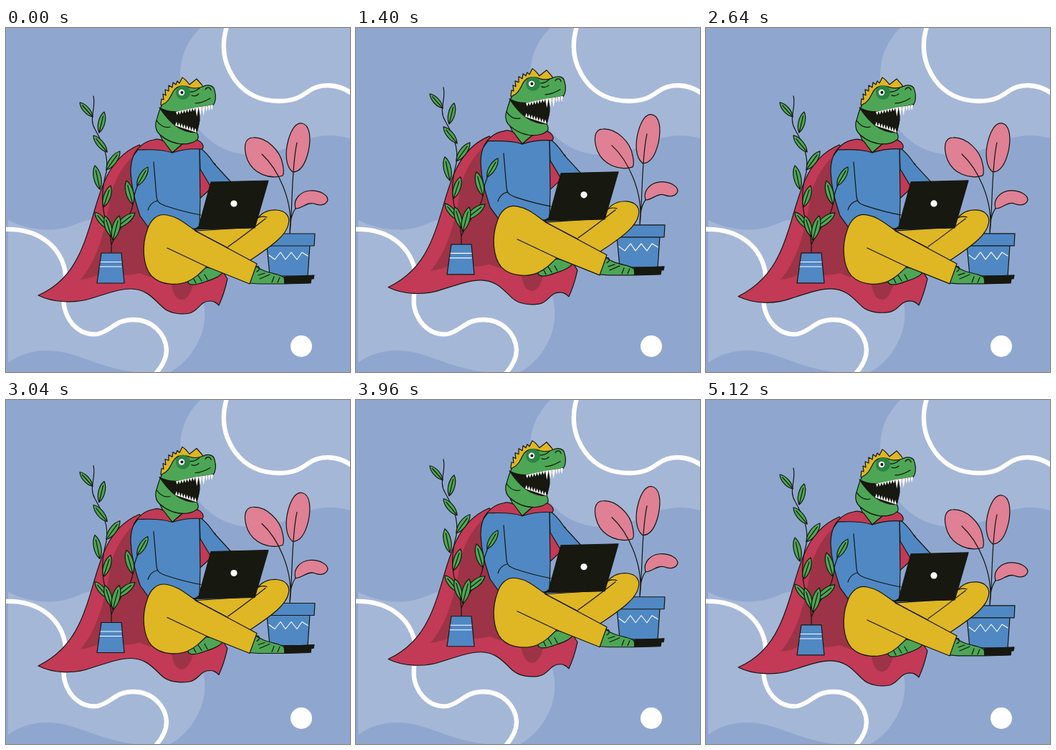
Write an HTML page that moves like this. It is 480 by 480 pixels and loops after 5.16 s.

```html
<!DOCTYPE html>
<html>
<head>
<meta charset="utf-8">
<style>
html, body { margin: 0; height: 100%; overflow: hidden; background: #8fa7cf }
svg { display: block; width: 100vw; height: 100vh }
.ink { stroke: #15170f; stroke-width: 1.2; stroke-linejoin: round; stroke-linecap: round }
.line { fill: none }
.red { fill: #c23a56 }
.dark { fill: #9d3346; stroke: none }
.blue { fill: #5088c4 }
.green { fill: #4da655 }
.yellow { fill: #dfb623 }
.pink { fill: #df8095 }
.black { fill: #17180f }
.blob { fill: #a5b7d7 }
.ribbon { fill: none; stroke: #fff; stroke-width: 6.3 }
.white { fill: #fff; stroke: none }
.trim { fill: none; stroke: #fff; stroke-width: 1.1 }
</style>
</head>
<body>
<svg viewBox="0 0 480 480">
  <path class="blob" d="M271 0C251 20 243 42 243 69C243 110 268 153 305 169C338 183 372 177 402 163C430 149 455 147 480 154V0Z"/>
  <path class="blob" d="M3 268C36 284 70 286 100 273C150 250 220 285 255 335C283 375 282 413 267 440C257 459 245 471 229 480H180C150 477 127 467 100 458C62 445 30 448 3 467Z"/>
  <path class="ribbon" d="M308 -2C300 25 304 51 320 73C335 93 357 102 381 102C402 102 411 96 421 89C439 76 464 78 482 91"/>
  <path class="ribbon" d="M-2 281C42 279 74 302 82 337C86 357 77 376 82 392C88 415 107 430 128 427C148 422 152 407 178 407C204 407 223 427 224 449C224 462 218 472 209 482"/>
  <circle class="white" cx="412" cy="444" r="15"/>

  <g id="scene" class="ink">
    <path id="cape" class="red"/>
    <path class="dark" d="M181 176C163 190 149 216 145 240C139 281 127 325 104 351C121 349 132 345 143 333C154 346 170 347 186 342L202 348L206 270L180 235Z"/>
    <path class="dark" d="M230 354C233 372 238 380 247 379C256 377 262 361 263 346Z"/>

    <g id="bigPlant">
      <path class="pink" d="M386 206C368 212 345 203 337 184C331 168 332 153 345 153C363 152 383 171 386 190C388 199 388 203 386 206Z"/>
      <path class="pink" d="M400 201C390 193 389 174 394 156C399 139 406 132 413 133C424 135 426 153 422 172C418 189 411 201 400 201Z"/>
      <path class="pink" d="M404 252C400 239 411 228 424 227C438 226 449 233 449 240C446 248 437 248 430 245C420 242 412 253 404 252Z"/>
      <path class="line" d="M357 176C378 195 402 240 396 287M406 160C398 195 400 255 396 287M404 252C398 260 396 270 396 287"/>
      <path class="blue" d="M364 303H424L421 346H368Z"/>
      <path class="blue" d="M359 287H431L430 304H361Z"/>
      <path class="trim" d="M367 317L375 323L383 313L390 323L398 313L406 323L413 313L421 318"/>
    </g>

    <path class="red" d="M265 172L292 190L288 222L266 242Z"/>
    <path class="blue" d="M270 167C281 174 286 183 291 190L314 215L286 222L271 197Z"/>
    <path class="blue" d="M184 169C176 177 174 188 174 201C175 225 181 243 187 262L200 280H270L271 240L270 168Z"/>
    <path class="line" d="M206 187L210 235C211 243 214 245 222 248C240 254 255 258 272 261M198 254C200 247 204 243 211 241"/>

    <g id="head">
      <path class="green" d="M213 145L219 158L232 174L248 160Z"/>
      <path class="yellow" d="M216 107L217 99L220 100L219 92L223 94L222 86L227 88L227 80L232 83L233 76L237 79L239 74L242 77L246 69C250 71 253 75 256 79L266 71L273 79L276 84L248 101L222 114Z"/>
      <path class="green" d="M218 107C226 104 229 97 233 89C239 79 249 80 257 83C264 85 269 84 274 82C282 78 290 80 291 87C294 96 292 104 289 108L270 112L269 134L266 146C271 153 267 162 254 162C238 163 224 157 215 149C210 145 208 140 209 132C212 123 213 115 218 107Z"/>
      <path class="black" d="M214 111C222 116 236 119 250 115C262 111 277 110 289 107L270 112L270 129L266 146C254 146 244 142 236 136C226 128 220 120 214 111Z"/>
      <path id="teeth" class="white"/>
      <path class="line" d="M210 129C215 136 222 140 229 138M255 89C262 90 266 87 270 84M259 94C264 96 267 94 269 92M278 86C280 82 285 82 286 87M264 105C273 105 280 101 285 98"/>
      <circle cx="247" cy="90" r="10" fill="#2d8344" stroke="none"/>
      <circle class="white" cx="245" cy="90" r="4.200"/>
      <circle class="black" cx="245.500" cy="90" r="1.500"/>
    </g>
    <path class="red" d="M178 178C184 166 194 158 206 156C212 154 217 156 220 158L232 174C214 168 196 170 184 170Z"/>
    <path class="red" d="M232 174L246 162C256 162 264 159 266 156C274 159 277 165 274 169C258 168 244 170 232 174Z"/>

    <path class="green" d="M254 354C256 346 270 342 276 334L305 337C301 346 291 350 278 354C268 358 255 361 254 354Z"/>
    <path class="line" d="M261 348L265 356M268 345L273 353M277 344L281 351"/>
    <path class="yellow" d="M266 283L344 278C351 260 363 253 378 254C391 255 397 264 394 274C391 289 372 303 347 320L335 328L280 330Z"/>
    <path class="line" d="M310 305C330 291 349 276 362 266M346 268C353 263 358 262 364 264"/>
    <path class="green" d="M347 331C356 339 367 341 379 344C389 347 392 351 388 357H352L339 356Z"/>
    <path class="line" d="M352 345L361 342M354 350L368 344M371 355L374 347M379 355L382 348M347 335C352 329 357 336 350 340"/>
    <path class="black" d="M388 347L430 345L429 350H426L425 356L389 357Z"/>
    <path class="yellow" d="M225 261C210 258 201 269 197 282C189 304 191 332 203 346C217 360 240 359 253 354C264 349 270 343 280 333L340 357L350 329L266 284C250 273 241 264 225 261Z"/>
    <path class="line" d="M225 307L280 333M264 283L310 307"/>
    <path class="black" d="M286 215L366 213L347 279L263 281L269 277Z"/>
    <circle class="white" cx="318" cy="245" r="4.600"/>

    <g id="smallPlant">
      <path class="line" d="M122 95C126 112 115 126 124 141C134 159 144 178 140 201C133 225 133 247 139 268C143 284 148 291 147 313M147 303C154 282 176 264 177 245C178 234 181 226 184 219"/>
      <path class="blue" d="M133 314H161L165 356H127Z"/>
      <path class="trim" d="M132 326.500H161M131 333H161"/>
    </g>
  </g>
</svg>
<script>
const $ = id => document.getElementById(id);
const LOOP = 5160;

function leaf(bx, by, tx, ty) {
  const dx = tx - bx, dy = ty - by, w = 0.2;
  const at = (along, side) => [bx + dx * along - dy * side, by + dy * along + dx * side];
  const half = s => `M${bx} ${by}C${at(.25, w * s)} ${at(.75, w * s)} ${tx} ${ty}`;
  const path = (d, cls) => `<path class="${cls}" d="${d}"/>`;
  return path(half(1) + `C${at(.75, -w)} ${at(.25, -w)} ${bx} ${by}Z`, 'green') +
    path(`M${bx} ${by}L${at(.8, 0)}`, 'line');
}

$('smallPlant').innerHTML += [
  [121, 124, 103, 104], [130, 146, 137, 117], [141, 173, 122, 150],
  [140, 198, 159, 172], [131, 225, 124, 192], [136, 250, 146, 220],
  [143, 280, 124, 257], [183, 220, 198, 194], [177, 246, 168, 213],
  [153, 279, 180, 258], [147, 291, 138, 262], [149, 296, 158, 262]
].map(p => leaf(...p)).join('');

// A row of spikes between two points; h is the spike height, negative is up.
function spikes(x0, y0, x1, y1, n, h) {
  let d = `M${x0} ${y0}`;
  const sx = (x1 - x0) / n, sy = (y1 - y0) / n;
  for (let i = 0; i < n; i++)
    d += `l${sx / 2} ${sy / 2 + h}l${sx / 2} ${sy / 2 - h}`;
  return d + 'Z';
}

$('teeth').setAttribute('d',
  spikes(237, 117, 264, 111, 7, 5) + spikes(264, 111, 278, 109, 3, 13) +
  spikes(278, 109, 289, 107, 3, 8) + spikes(236, 136, 266, 146, 8, -6));

function draw(now) {
  const t = now % LOOP, turn = 2 * Math.PI * t / LOOP;
  const lift = -6.2 * (1 - Math.cos(2 * turn));
  const wave = .8 * (1 - Math.cos(turn));
  $('scene').setAttribute('transform', `translate(0 ${lift})`);
  const tip = 373 + wave, low = 399 - wave;
  $('cape').setAttribute('d',
    `M186 163C162 173 147 191 137 215C122 250 118 285 101 318C88 345 68 363 45 ${tip}` +
    `C65 ${tip + 10} 95 ${tip + 12} 120 377C145 369 160 364 174 364C196 364 206 378 218 389` +
    `C228 ${low} 244 ${low + 1} 256 ${low - 1}C270 394 270 381 285 381C291 381 294 384 297 387` +
    `C303 374 306 364 309 350L270 290L200 180Z`);
  requestAnimationFrame(draw);
}
requestAnimationFrame(draw);
</script>
</body>
</html>
```
